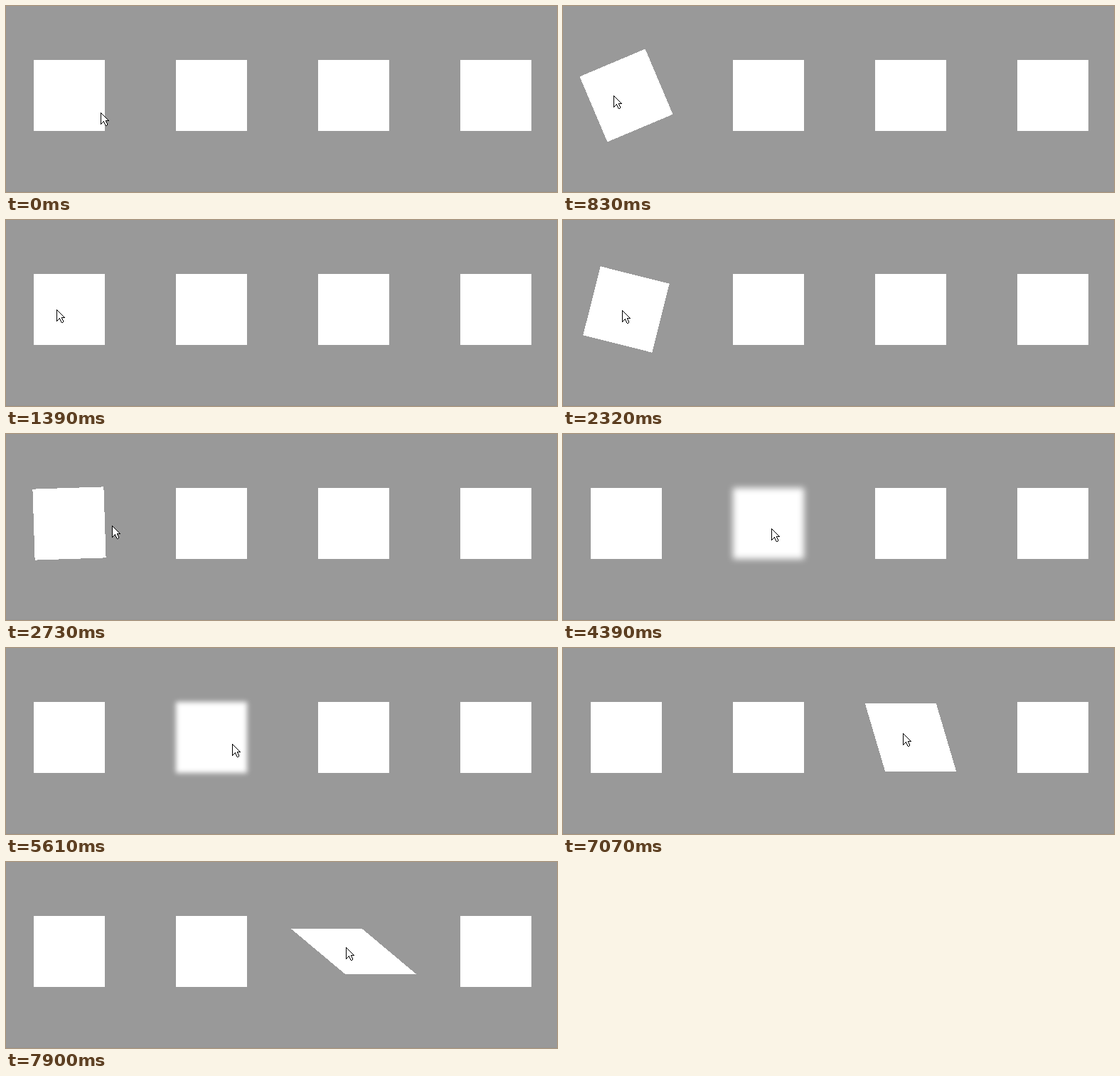
These frames come from a looping animation (775x262 px, 8 s). An HTML page:

```html
<!DOCTYPE html>
<html lang="en">
<head>
<meta charset="utf-8">
<title>Box effects</title>
<style>
  html, body { margin: 0; width: 100%; height: 100%; overflow: hidden; background: #999; }
  svg { position: absolute; left: 0; top: 0; shape-rendering: crispEdges; }
  .box { fill: #fff; transform-box: fill-box; transform-origin: center; }
</style>
</head>
<body>
<svg id="stage" width="775" height="262" viewBox="0 0 775 262">
  <rect width="775" height="262" fill="#999"/>
  <rect y="261" width="775" height="1" fill="#959595"/>
  <g id="boxes"></g>
  <path id="cursor" fill="#fff" stroke="#000"
    d="M.5 .5V16.5L4.5 12.5L6.5 17.5L7.5 18.5H8.5L9.5 17.5V16.5L7.5 11.5H11.5Z"/>
</svg>
<script>
const LOOP = 8000, TWEEN = 1000, SIZE = 100, GAP = 200;
const cursor = document.getElementById('cursor');

const [spin, blur, skew] = Array.from({ length: 4 }, (_, i) => {
  const box = document.createElementNS('http://www.w3.org/2000/svg', 'rect');
  const attributes = { class: 'box', x: 39 + i * GAP, y: 76, width: SIZE, height: SIZE };
  for (const name in attributes) box.setAttribute(name, attributes[name]);
  document.getElementById('boxes').append(box);
  return box;
});

const progress = (t, start, end) => Math.min(1, Math.max(0, (t - start) / (end - start)));
const easeOut = u => 1 - (1 - u) ** 2;
const smooth = u => u * u * (3 - 2 * u);

// Plays forward from `start`, then the same tween runs backwards from `back`.
function toggle(t, start, back = Infinity) {
  const u = t < back ? progress(t, start, start + TWEEN) : 1 - progress(t, back, back + TWEEN);
  return easeOut(u);
}

// The pointer glides onto each box, drifting a little before it moves on.
function pointer(t) {
  const enter = smooth(progress(t, 70, 380));
  const drift1 = smooth(progress(t, 1790, 2320));
  const toBlur = smooth(progress(t, 2320, 3420));
  const drift2 = smooth(progress(t, 5040, 5610));
  const toSkew = smooth(progress(t, 5610, 6660));
  return [
    133 - 62 * enter + 12 * drift1 + 210 * toBlur + 25 * drift2 + 160 * toSkew,
    150 - 24 * enter + drift1 + 6 * toBlur + 2 * drift2 - 15 * toSkew
  ].map(Math.round);
}

function draw(t) {
  spin.style.transform = `rotate(${360 * toggle(t, 391, 1862)}deg)`;

  const radius = 5 * toggle(t, 3680, 5110);
  blur.style.filter = radius > 0 ? `blur(${radius}px)` : 'none';

  // The slanted sides keep their length, so the height shrinks with the angle.
  const angle = 50 * toggle(t, 6890) * Math.PI / 180;
  skew.style.transform = `matrix(1, 0, ${Math.sin(angle)}, ${Math.cos(angle)}, 0, 0)`;

  const [x, y] = pointer(t);
  cursor.setAttribute('transform', `translate(${x} ${y})`);
}

const begin = performance.now();
function tick() {
  draw((performance.now() - begin) % LOOP);
  requestAnimationFrame(tick);
}
tick();
</script>
</body>
</html>
```
